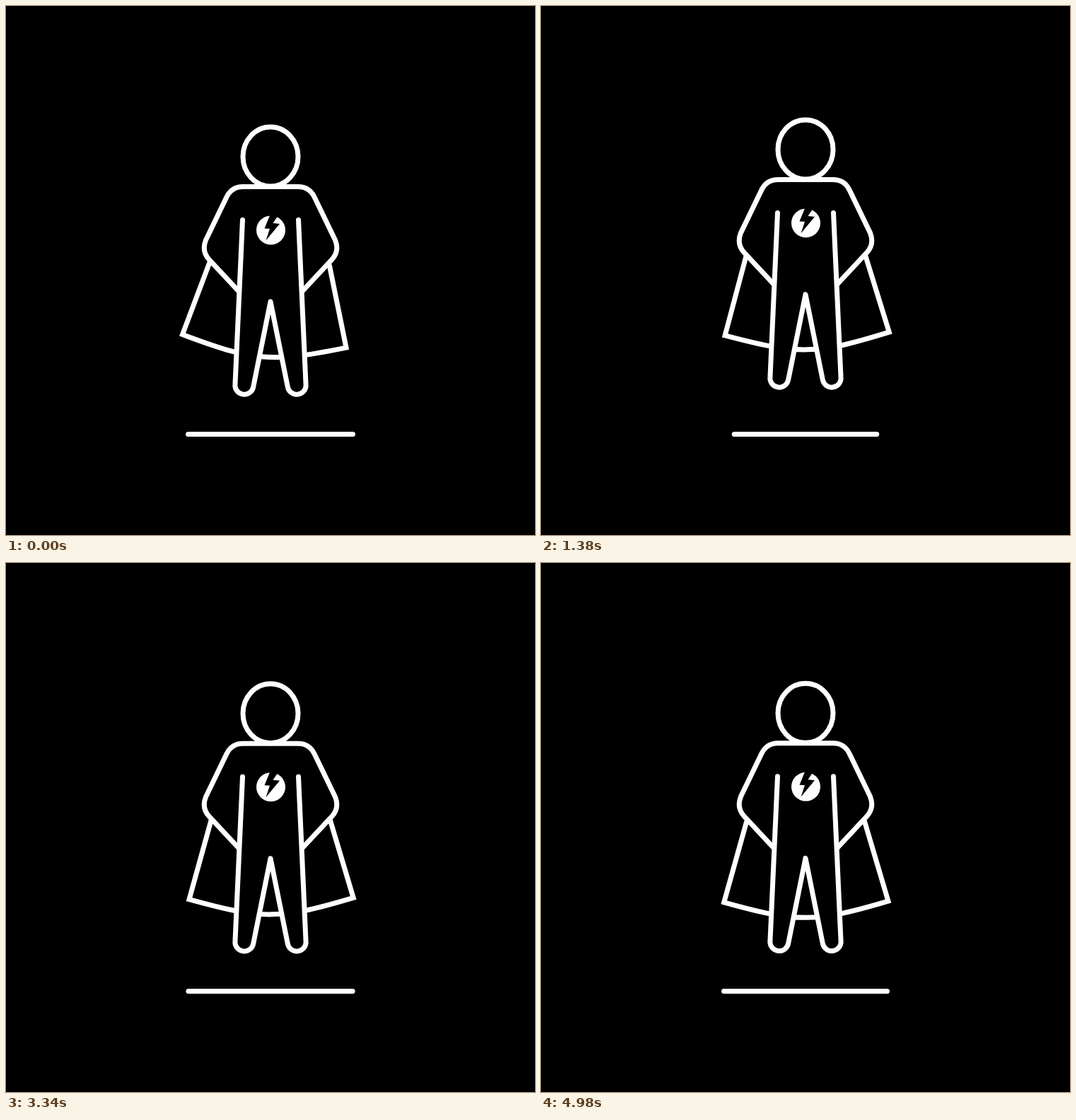
Write an HTML page that moves like this. It is 748 px wide and 748 px high and loops after 5000 ms.

```html
<!DOCTYPE html>
<html lang="en">
<head>
<meta charset="utf-8">
<title>Hovering hero</title>
<style>
  html, body { margin: 0; width: 100%; height: 100%; overflow: hidden; background: #000; }
  svg { display: block; width: 100%; height: 100%; }
</style>
</head>
<body>
<svg viewBox="0 0 748 748" fill="#000" stroke="#fff" stroke-width="7" stroke-linecap="round">
  <g id="hero">
    <path id="cape" fill="none" d="M300 350Q291 362 289.2 371L257.9 479.7C320 497.5 345 502 374 502S428 497.5 490.1 479.7L458.8 371Q457 362 448 350"/>
    <g stroke-linejoin="round">
      <path d="M329.5 404L287.5 359C280 351 278.5 341 282.5 331L312 270Q319 255.5 335 255.5H413Q429 255.5 436 270L465.5 331C469.5 341 468 351 460.5 359L418.5 404"/>
      <ellipse cx="374" cy="213" rx="39" ry="42"/>
      <path d="M334.5 302.5L324 534.5A13 13 0 0 0 349.8 538L374 418L398.2 538A13 13 0 0 0 424 534.5L413.5 302.5"/>
    </g>
    <g stroke="none">
      <circle cx="374.5" cy="317" r="20.5" fill="#fff"/>
      <path d="M373.5 295L365.5 314.5L373 315L367.5 331.5L387 308L377.5 307L384.5 296.5V295Z"/>
    </g>
  </g>
  <path id="ground"/>
</svg>
<script>
const LOOP = 5000, BOB = LOOP / 3, FLAP = 540, GUST = 5;
const [hero, cape, ground] = ['hero', 'cape', 'ground'].map(id => document.getElementById(id));

// Key poses of the cape: time, tilt in degrees, height against the body
const poses = [
  [0, 4.5, -5.5], [440, -.85, 0], [1380, -1.2, -6], [2160, -.4, 0],
  [2880, 2.85, -3.3], [3800, -4.1, -6.4], [4980, -.5, 0]
];

// Ease from pose to pose, with whole flaps of wind in between
function capePose(t) {
  const next = poses.findIndex(pose => pose[0] > t);
  const i = next < 0 ? poses.length - 1 : next;
  const [t0, tilt0, y0] = poses[i - 1], [t1, tilt1, y1] = poses[i];
  const p = (t - t0) / (t1 - t0), ease = p * p * (3 - 2 * p);
  const flaps = Math.round((t1 - t0) / FLAP);
  return {
    tilt: tilt0 + (tilt1 - tilt0) * ease + GUST * Math.sin(2 * Math.PI * flaps * p),
    y: y0 + (y1 - y0) * ease
  };
}

function draw(now) {
  const t = now % LOOP;
  const rise = 1 - Math.abs(1 - 2 * (t % BOB) / BOB);
  const half = 116.5 - 46 * rise;
  const { tilt, y } = capePose(t);
  hero.setAttribute('transform', `translate(0 ${-29.5 * rise})`);
  cape.setAttribute('transform', `translate(0 ${y}) rotate(${tilt} 374 370)`);
  ground.setAttribute('d', `M${374 - half} 605.5H${374 + half}`);
}

const start = performance.now();
function loop() {
  draw(performance.now() - start);
  requestAnimationFrame(loop);
}
loop();
</script>
</body>
</html>
```
